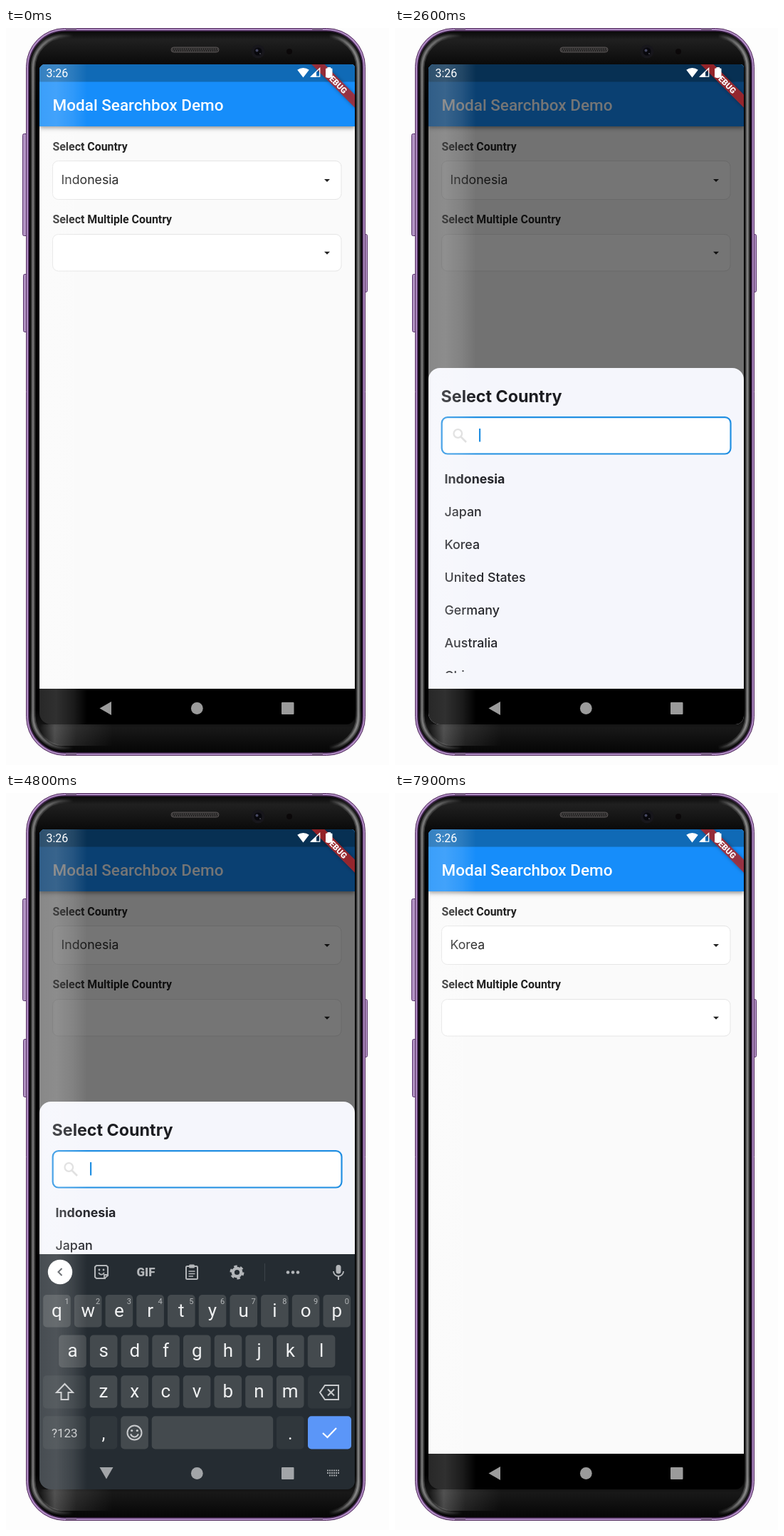
Write an HTML page with a canvas that moves like this. It is 538 px wide and 1034 px high and loops after 8 s.

```html
<!DOCTYPE html>
<html lang="en">
<head>
<meta charset="utf-8">
<title>Modal Searchbox Demo</title>
<style>
html, body { margin: 0; width: 100%; height: 100%; overflow: hidden; background: #fdfdfd; }
canvas { display: block; width: 538px; height: 1034px; }
</style>
</head>
<body>
<canvas id="stage"></canvas>
<script>
const W = 538, H = 1034, LOOP = 8000;
const canvas = document.getElementById('stage');
const ctx = canvas.getContext('2d');
const dpr = window.devicePixelRatio || 1;
canvas.width = W * dpr;
canvas.height = H * dpr;

const GEO = 'Inter, sans-serif', ROBOTO = 'Roboto, sans-serif';
const COUNTRIES = ['Indonesia', 'Japan', 'Korea', 'United States', 'Germany', 'Australia', 'China'];
const SCREEN = { l: 47, t: 51, r: 490, b: 977 };
const KEYBOARD_TOP = 647, NAV_TOP = 927;
const ICON = '#b3b6b9', KEY = '#444a4e', FUNC_KEY = '#30373c', PANEL = '#252c32';

const mix = (a, b, k) => a + (b - a) * k;
const clamp = v => Math.min(1, Math.max(0, v));
const easeOut = v => 1 - (1 - v) ** 3;
const ramp = (t, from, to) => easeOut(clamp((t - from) / (to - from)));

function box(x, y, w, h, r, fill, stroke, width = 1) {
  ctx.beginPath();
  ctx.roundRect(x, y, w, h, r);
  if (fill) { ctx.fillStyle = fill; ctx.fill(); }
  if (stroke) { ctx.strokeStyle = stroke; ctx.lineWidth = width; ctx.stroke(); }
}
function disc(x, y, r, fill) {
  ctx.beginPath();
  ctx.arc(x, y, r, 0, 7);
  ctx.fillStyle = fill;
  ctx.fill();
}
function ring(x, y, r, color, width) {
  ctx.beginPath();
  ctx.arc(x, y, r, 0, 7);
  ctx.strokeStyle = color;
  ctx.lineWidth = width;
  ctx.stroke();
}
function shape(points, fill) {
  ctx.beginPath();
  points.forEach(p => ctx.lineTo(...p));
  ctx.fillStyle = fill;
  ctx.fill();
}
function line(points, color, width, close) {
  ctx.beginPath();
  points.forEach(p => ctx.lineTo(...p));
  if (close) ctx.closePath();
  ctx.strokeStyle = color;
  ctx.lineWidth = width;
  ctx.stroke();
}
function text(s, x, y, size, color, { weight = 400, face = ROBOTO, align = 'left' } = {}) {
  ctx.font = `${weight} ${size}px ${face}`;
  ctx.textAlign = align;
  ctx.fillStyle = color;
  ctx.fillText(s, x, y);
}
function gradient(x0, y0, x1, y1, stops) {
  const g = ctx.createLinearGradient(x0, y0, x1, y1);
  stops.forEach(([at, color]) => g.addColorStop(at, color));
  return g;
}

function drawBody() {
  ctx.fillStyle = '#fdfdfd';
  ctx.fillRect(0, 0, W, H);
  for (const [x, y, w, h] of [[23.5, 148.5, 8, 143], [24.5, 345.5, 8, 81], [500, 289.5, 7.5, 81]])
    box(x, y, w, h, 2, '#b293c3', '#57306b');
  box(28.5, 0.5, 476, 1020, 54, '#ae8ac2', '#55305f');
  const glass = gradient(0, 4, 0, 1017, [[0, '#080808'], [0.012, '#202020'], [0.05, '#080808'], [0.1, '#000'],
    [0.94, '#000'], [0.965, '#181818'], [1, '#050505']]);
  box(32, 4, 469, 1013, 51, glass, '#3c2148', 1.5);

  // Reflections on the curved sides follow the corners.
  const sides = gradient(34, 0, 500, 0, [[0, '#ffffff30'], [0.05, '#ffffff20'], [0.13, '#fff0'],
    [0.9, '#fff0'], [0.96, '#ffffff28'], [1, '#ffffff38']]);
  for (const width of [7, 4, 2])
    box(38, 11, 457, 999, 45, null, sides, width);

  ctx.fillStyle = gradient(48, 0, 150, 0, [[0, '#fff0'], [0.2, '#ffffff40'], [0.5, '#ffffff18'], [1, '#fff0']]);
  ctx.beginPath();
  ctx.roundRect(48, 977, 110, 30, [0, 0, 0, 30]);
  ctx.fill();

  for (const x of [84, 430])
    for (const y of [0, 1017]) { ctx.fillStyle = '#7d6389'; ctx.fillRect(x, y, 15, 3); }

  box(232, 27, 67, 7, 3.5, '#3b3939', '#555050');
  ctx.setLineDash([1, 2]);
  line([[235, 29.5], [297, 29.5]], '#111', 1.3);
  line([[236, 32], [297, 32]], '#111', 1.3);
  ctx.setLineDash([]);
  disc(354, 33, 9.5, '#17161b');
  disc(354, 33, 5.5, '#08080d');
  disc(352.5, 31.5, 2, '#454760');
  disc(357, 36, 1, '#4b4b57');
  disc(398, 33, 4, '#0b0809');
}

function drawSelect(y, h, value) {
  box(65.5, y + 0.5, 405.5, h, 8, '#fff', '#e5e5e5');
  text(value, 77.5, y + 32.5, 17.7, '#2b2b2b', { face: GEO });
  const c = y + h / 2 - 1;
  shape([[447, c], [455, c], [451, c + 4]], '#222');
}

function drawPage(value, dim) {
  ctx.fillStyle = '#fafafa';
  ctx.fillRect(47, 51, 443, 880);
  ctx.save();
  ctx.shadowColor = '#0007';
  ctx.shadowBlur = 6 * dpr;
  ctx.shadowOffsetY = 2 * dpr;
  ctx.fillStyle = '#168dfa';
  ctx.fillRect(47, 51, 443, 87);
  ctx.restore();
  ctx.fillStyle = '#106ab6';
  ctx.fillRect(47, 51, 443, 24.5);
  text('Modal Searchbox Demo', 65.5, 115.5, 22.5, '#fff', { weight: 500 });
  text('Select Country', 65.5, 171.5, 15.9, '#222', { weight: 700 });
  drawSelect(186, 54, value);
  text('Select Multiple Country', 65.5, 273.5, 15.9, '#222', { weight: 700 });
  drawSelect(289, 51.5, '');
  ctx.fillStyle = `rgba(0,0,0,${0.54 * dim})`;
  ctx.fillRect(47, 51, 443, 880);
}

function drawSheet(top, listEnd, s) {
  box(47, top, 443, 500, [16, 16, 0, 0], '#f5f6fc');
  text('Select Country', 64.5, top + 48, 23.3, '#1c1d22', { weight: 700, face: GEO });
  if (s.focused) box(65.7, top + 69.2, 405.8, 51.3, 8, '#fff', '#218fe2', 2.2);
  else box(65.5, top + 68.5, 406.5, 53, 8, '#fff', '#e2e3e8');
  ring(88.3, top + 92, 5.8, '#dedede', 2.3);
  line([[92.5, top + 96.5], [100, top + 104]], '#dedede', 2.6);

  text(s.query, 118, top + 99, 18, '#222');
  const queryWidth = ctx.measureText(s.query).width;
  ctx.fillStyle = '#333';
  if (s.query) ctx.fillRect(118, top + 101, queryWidth, 1);
  ctx.fillStyle = '#218fe2';
  if (s.caret) ctx.fillRect(118 + queryWidth, top + 85, 2.2, 18.5);

  ctx.save();
  ctx.beginPath();
  ctx.rect(47, top + 125, 443, Math.max(0, listEnd - top - 125));
  ctx.clip();
  COUNTRIES.filter(c => c.toLowerCase().includes(s.query)).forEach((c, i) =>
    text(c, 69.5, top + 161.5 + i * 46.1, 17.8, '#24252a', { weight: c === s.value ? 700 : 500, face: GEO }));
  ctx.restore();
}

function drawMic() {
  box(463.5, 662, 7, 12.5, 3.5, ICON);
  ctx.beginPath();
  ctx.arc(467, 671, 7, 0, Math.PI);
  ctx.strokeStyle = ICON;
  ctx.lineWidth = 1.8;
  ctx.stroke();
  line([[467, 678], [467, 683]], ICON, 2);
}

function drawToolbar(query) {
  disc(76, 672, 17.2, '#fff');
  const d = query ? 1 : -1;
  line([[76 - 2.5 * d, 667], [76 + 2.5 * d, 672], [76 - 2.5 * d, 677]], '#50555a', 2);
  drawMic();
  if (query) {
    const tail = query.slice(1);
    const alternatives = { k: 'ok', ko: 'to', kor: 'for', kore: 'more' };
    [query, alternatives[query], 'K' + tail].forEach((word, i) =>
      text(word, 146 + i * 121, 679.5, 20, '#cfd2d4', { align: 'center' }));
    for (const x of [203.5, 331.5]) line([[x, 659], [x, 685]], '#3b4348', 1);
    return;
  }
  line([[140, 681], [127, 681], [125, 679], [125, 665], [127, 663], [141, 663], [143, 665], [143, 677], [138, 681]], ICON, 2.1);
  line([[143, 676], [138, 676], [138, 681]], ICON, 1.8);
  disc(131, 669, 1.4, ICON);
  disc(137, 669, 1.4, ICON);
  ctx.beginPath();
  ctx.arc(134, 671.5, 4, 0.3, 2.8);
  ctx.stroke();

  text('GIF', 196.5, 678, 17, ICON, { weight: 900, align: 'center' });

  box(253, 664, 16, 18, 1.5, null, ICON, 2);
  box(257, 661.5, 8, 5, 1.5, ICON);
  [671, 674.5, 678].forEach((y, i) => line([[256.5, y], [i === 2 ? 263 : 265.5, y]], ICON, 1.6));

  ring(324.5, 672.5, 5.7, ICON, 4.2);
  ctx.setLineDash([4.5, 4.5]);
  ring(324.5, 672.5, 8.6, ICON, 2.8);
  ctx.setLineDash([]);

  line([[363.5, 660], [363.5, 685]], '#3b4348', 1);
  for (const x of [396, 403, 410]) disc(x, 672.5, 2.3, ICON);
}

function drawKeys() {
  const white = '#f0f1f2';
  const letterRow = (letters, x0, y, digits) => [...letters].forEach((ch, i) => {
    const x = x0 + i * 43.7;
    box(x - 19.3, y, 38.6, 45.5, 5, KEY);
    text(ch, x, y + 30.5, 26, white, { align: 'center' });
    if (digits) text((i + 1) % 10, x + 14, y + 12.5, 11, '#b4b7b9', { align: 'center' });
  });
  letterRow('qwertyuiop', 71.5, 704, true);
  letterRow('asdfghjkl', 93.5, 760.5);
  letterRow('zxcvbnm', 137, 817.3);

  for (const y of [817.3, 874.3]) {
    box(52, y, 60.5, 46.2, 5, FUNC_KEY);
    box(424, y, 61, 46.2, 5, y > 850 ? '#5b96f8' : FUNC_KEY);
  }
  line([[82.5, 829], [94, 841], [87.5, 841], [87.5, 851], [77.5, 851], [77.5, 841], [71, 841]], '#c8cacc', 2, true);
  line([[448, 831], [467, 831], [467, 851], [448, 851], [441, 841]], '#c8cacc', 2, true);
  line([[452, 836.5], [461, 845.5]], '#c8cacc', 2);
  line([[461, 836.5], [452, 845.5]], '#c8cacc', 2);

  text('?123', 82.3, 903.5, 17, '#c8cacc', { align: 'center' });
  box(117.7, 874.3, 38.6, 46.2, 5, FUNC_KEY);
  text(',', 137, 907, 25, white, { align: 'center' });
  box(161.3, 874.3, 38.6, 46.2, 5, KEY);
  ring(180.5, 897.5, 10, '#c8cacc', 2);
  disc(176.7, 894.5, 1.6, '#c8cacc');
  disc(184.3, 894.5, 1.6, '#c8cacc');
  ctx.beginPath();
  ctx.arc(180.5, 898, 5.5, 0.25, 2.9);
  ctx.stroke();
  box(204.7, 874.3, 170.5, 46.2, 5, KEY);
  box(380, 874.3, 38.6, 46.2, 5, FUNC_KEY);
  text('.', 399.3, 907, 25, white, { align: 'center' });
  line([[445, 898], [451.5, 904], [464, 891]], '#fff', 2.2);
}

function drawKeyboard(shown, query) {
  ctx.save();
  ctx.translate(0, (1 - shown) * (SCREEN.b - KEYBOARD_TOP));
  ctx.fillStyle = PANEL;
  ctx.fillRect(47, KEYBOARD_TOP, 443, 330);
  drawToolbar(query);
  drawKeys();
  ctx.restore();
}

function drawNavigation(typing) {
  const c = typing ? '#a2a5a8' : '#9b9b9b';
  ctx.fillStyle = typing ? PANEL : '#000';
  ctx.fillRect(47, NAV_TOP, 443, 52);
  shape(typing ? [[131.5, 946], [150.5, 946], [141, 962.5]] : [[131.5, 954.5], [148, 945], [148, 964]], c);
  disc(268.3, 954.5, 8.4, c);
  box(387, 946, 17.5, 17, 1, c);
  if (!typing) return;
  for (let row = 0; row < 3; row++)
    for (let i = 0; i < 6; i++) {
      ctx.fillStyle = c;
      if (row < 2 || (i > 0 && i < 5)) ctx.fillRect(451 + i * 3, 949.5 + row * 3.5, 2, 2);
    }
}

function drawStatus() {
  text('3:26', 56.5, 68.5, 16, '#fff');
  ctx.beginPath();
  ctx.moveTo(417.5, 69.5);
  ctx.arc(417.5, 69.5, 13.5, -Math.PI * 0.71, -Math.PI * 0.29);
  ctx.fillStyle = '#fff';
  ctx.fill();

  ctx.save();
  ctx.translate(SCREEN.r, SCREEN.t);
  ctx.rotate(Math.PI / 4);
  ctx.shadowColor = '#0006';
  ctx.shadowBlur = 5 * dpr;
  ctx.fillStyle = 'rgba(188,36,36,0.78)';
  ctx.fillRect(-45, 30, 90, 13);
  ctx.shadowColor = 'transparent';
  text('DEBUG', 0, 40.7, 11.5, '#fff', { weight: 900, align: 'center' });
  ctx.restore();

  line([[428.5, 68.2], [440.7, 68.2], [440.7, 56.5]], '#fff', 1.3, true);
  shape([[428, 69], [436, 61], [436, 69]], '#fff');
  box(449, 56.5, 9.5, 13, 1.2, '#fff');
  ctx.fillRect(451.5, 55, 4.5, 2);
}

function stateAt(t) {
  const typed = [5200, 5500, 5900, 6300].filter(at => t >= at).length;
  const focused = t >= 2450;
  return {
    value: t >= 6600 ? 'Korea' : 'Indonesia',
    query: 'kore'.slice(0, typed),
    focused,
    caret: focused && (typed > 0 || Math.floor((t - 2450) / 500) % 2 === 0),
    open: ramp(t, 600, 1000) - ramp(t, 6800, 7200),
    keyboard: ramp(t, 2700, 3000) - ramp(t, 6800, 7100)
  };
}

function draw(t) {
  const s = stateAt(t);
  ctx.setTransform(dpr, 0, 0, dpr, 0, 0);
  drawBody();

  ctx.save();
  ctx.beginPath();
  ctx.roundRect(SCREEN.l, SCREEN.t, SCREEN.r - SCREEN.l, SCREEN.b - SCREEN.t, [8, 5, 12, 16]);
  ctx.clip();
  drawPage(s.value, s.open);
  if (s.open > 0) {
    const top = mix(NAV_TOP, mix(477, 433, s.keyboard), s.open);
    drawSheet(top, mix(905, KEYBOARD_TOP, s.keyboard), s);
  }
  const typing = s.keyboard > 0;
  if (typing) drawKeyboard(s.keyboard, s.query);
  drawNavigation(typing);

  ctx.fillStyle = gradient(47, 0, 114, 0, [[0, '#ffffff28'], [0.35, '#ffffff30'], [0.7, '#ffffff1c'], [1, '#fff0']]);
  ctx.fillRect(47, 51, 67, 926);
  drawStatus();
  ctx.restore();
}

const start = performance.now();
function tick() {
  const t = (performance.now() - start) % LOOP;
  draw(Math.floor(t / 100) * 100);
  requestAnimationFrame(tick);
}
tick();
</script>
</body>
</html>
```
